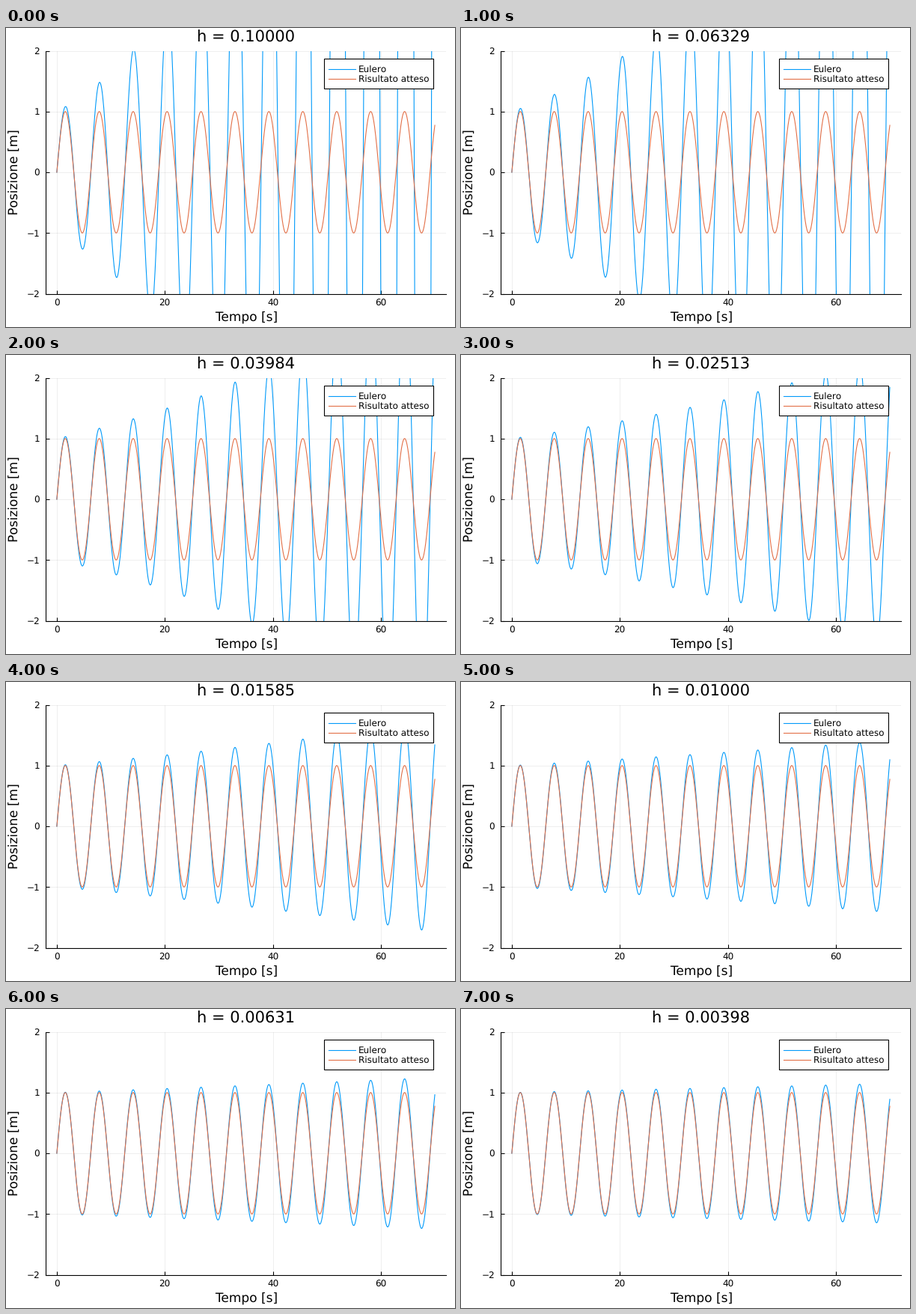
A matplotlib script for the animation above (8 s loop, 600 by 400 pixels).

```python
import numpy as np
import matplotlib.pyplot as plt
from matplotlib.animation import FuncAnimation
from matplotlib.lines import Line2D
from matplotlib.patches import Rectangle

W, H, DPI = 600, 400, 100
PT = 72 / DPI  # points per pixel
BLUE, ORANGE = "#009AFA", "#E36F47"
LEFT, RIGHT, TOP, BOTTOM = 52.75, 588.2, 30.5, 355.5
T_END = 70
STEPS = [7 * round(10 ** (2 + 0.2 * k)) for k in range(8)]

plt.rcParams.update({"font.family": "DejaVu Sans", "text.hinting": "none",
                     "text.hinting_factor": 1})
fig = plt.figure(figsize=(W / DPI, H / DPI), dpi=DPI, facecolor="white")
ax = fig.add_axes([LEFT / W, 1 - BOTTOM / H, (RIGHT - LEFT) / W, (BOTTOM - TOP) / H])


def label(x, y, text, size, ha="center", **kw):
    """Text with its baseline at pixel (x, y), y counted from the top."""
    return fig.text(x / W, 1 - y / H, text, fontsize=size * PT, ha=ha,
                    va="baseline", zorder=12, **kw)


def legend_row(y, text, color):
    fig.add_artist(Line2D([431 / W, 467 / W], [1 - y / H] * 2, color=color,
                          lw=1.1 * PT, zorder=11))
    label(471.3, y + 4.5, text, 12, ha="left")


def euler(steps):
    """Explicit Euler for x'' = -x with x(0) = 0, v(0) = 1, in closed form."""
    h = T_END / steps
    n = np.arange(steps + 1)
    growth = (1 + h * h) ** (n / 2)
    return n * h, growth * np.sin(n * np.arctan(h))


# Axes
ax.set_xlim(-0.03 * T_END, 1.03 * T_END)
ax.set_ylim(-2, 2)
ax.set_xticks(range(0, 61, 20))
ax.set_yticks(range(-2, 3))
ax.tick_params(direction="in", length=5 * PT, width=1.1 * PT,
               labelbottom=False, labelleft=False)
ax.set_axisbelow(True)
ax.grid(color="black", alpha=0.1, lw=0.6 * PT)
for side in ("top", "right"):
    ax.spines[side].set_visible(False)
for side in ("left", "bottom"):
    ax.spines[side].set(linewidth=1.1 * PT, zorder=1)

for t in range(0, 61, 20):
    label(67.9 + t * 7.2165, 372, str(t), 12)
for v in range(-2, 3):
    label(45, 193 - 81.25 * v + 4.6, str(v).replace("-", "\u2212"), 12, ha="right")
label(321, 392, "Tempo [s]", 16.5)
fig.text(16.3 / W, 1 - 193 / H, "Posizione [m]", fontsize=16.5 * PT, rotation=90,
         rotation_mode="anchor", ha="center", va="baseline")
title = label(320.3, 18.4, "", 21)

# Curves
blue_line, = ax.plot([], [], color=BLUE, lw=1.1 * PT, zorder=3)
time = np.linspace(0, T_END, 1401)
ax.plot(time, np.sin(time), color=ORANGE, lw=1.1 * PT, zorder=4)

# Legend
fig.add_artist(Rectangle((425.5 / W, 1 - 80.5 / H), 145 / W, 39 / H, fc="white",
                         ec="black", lw=1.1 * PT, zorder=10,
                         transform=fig.transFigure))
legend_row(54.5, "Eulero", BLUE)
legend_row(67.5, "Risultato atteso", ORANGE)


def update(i):
    blue_line.set_data(*euler(STEPS[i]))
    title.set_text(f"h = {T_END / STEPS[i]:.5f}")
    return blue_line, title


anim = FuncAnimation(fig, update, frames=len(STEPS), interval=1000, repeat=True)
plt.show()
```
